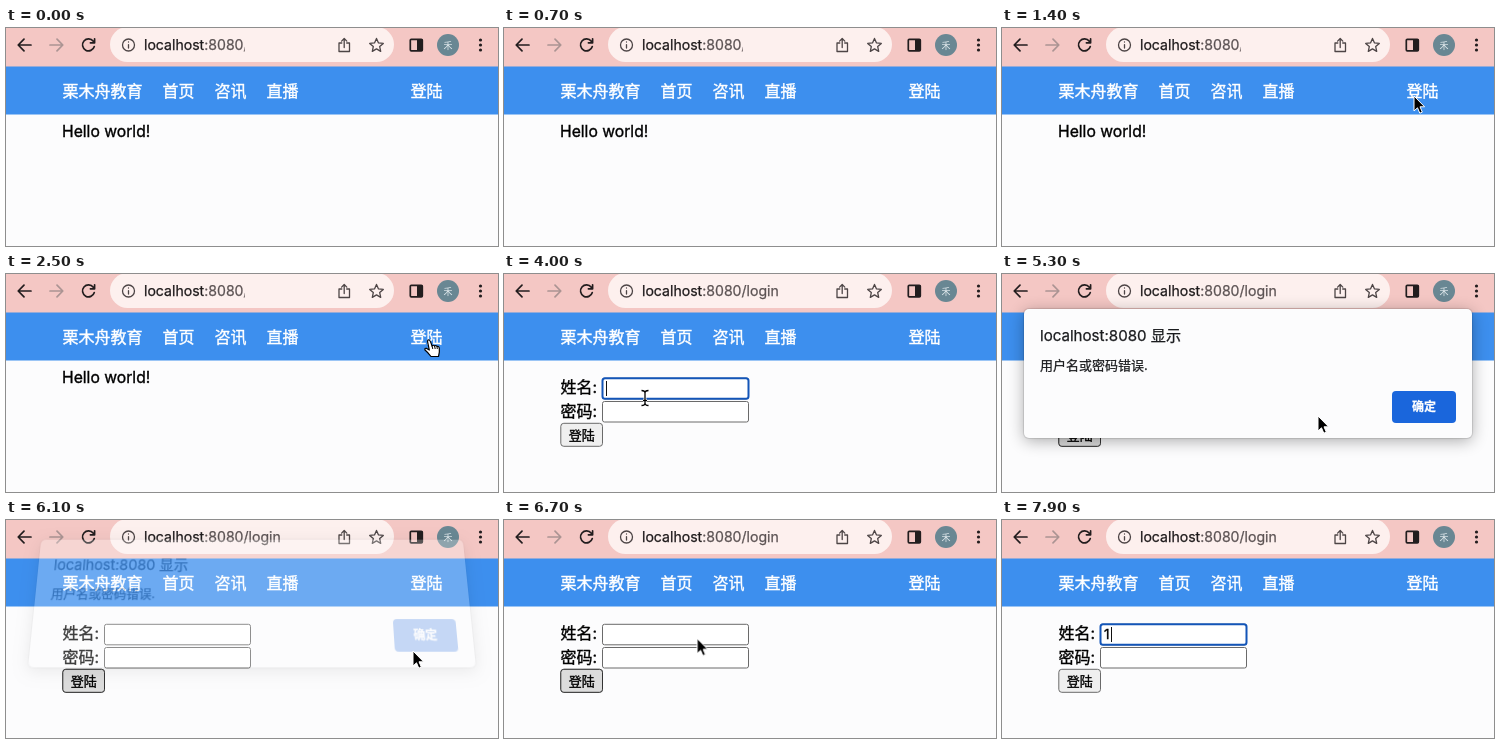
Write an HTML page that moves like this. It is 492 by 218 pixels and loops after 8 s.

```html
<!DOCTYPE html>
<html lang="zh-CN">
<head>
<meta charset="utf-8">
<title>Login demo</title>
<style>
html, body { margin: 0; width: 100%; height: 100%; overflow: hidden; background: #fcfcfd; }
body { position: relative; font-family: Inter, "Noto Sans CJK SC", "Noto Sans CJK", sans-serif; }
svg { position: absolute; left: 0; top: 0; display: block; }
text { white-space: pre; }
.line { fill: none; stroke: #221d1e; stroke-width: 1.7; stroke-linecap: round; stroke-linejoin: round; }
.nav { font-size: 16px; fill: #fff; stroke: #fff; stroke-width: .4; }
.ink { fill: #000; stroke: #000; stroke-width: .35; }
.body { font-size: 16px; }
.field { fill: #fff; stroke: #6a6a6a; }

/* every timeline lasts 8 s, 1% = 80 ms */
.home, .login, .focus, .caret1, .caret2, .typed, .pressed, .arrow, .hand, .beam {
  animation: 8s step-end infinite;
}
.home { animation-name: home; }
.login { animation-name: login; }
.focus { animation-name: focus; }
.caret1 { animation-name: caret1; }
.caret2 { animation-name: caret2; }
.typed { animation-name: typed; }
.pressed { animation-name: pressed; }
.arrow { animation-name: arrow; }
.hand { animation-name: hand; }
.beam { animation-name: beam; }
.pointer { animation: move 8s ease-in-out infinite; }

@keyframes home { 0% { opacity: 1 } 36.25%, 100% { opacity: 0 } }
@keyframes login { 0% { opacity: 0 } 36.25%, 100% { opacity: 1 } }
@keyframes focus { 0%, 58.75% { opacity: 0 } 47.5%, 87.5%, 100% { opacity: 1 } }
@keyframes caret1 { 0%, 53.75%, 93.75%, 100% { opacity: 0 } 47.5%, 87.5% { opacity: 1 } }
@keyframes caret2 { 0% { opacity: 0 } 95%, 100% { opacity: 1 } }
@keyframes typed { 0% { opacity: 0 } 95%, 100% { opacity: 1 } }
@keyframes pressed { 0%, 87.5%, 100% { opacity: 0 } 58.75% { opacity: 1 } }
@keyframes arrow { 0%, 18.75%, 45%, 86.25%, 100% { opacity: 0 } 9%, 37.5%, 52.5% { opacity: 1 } }
@keyframes hand { 0%, 37.5%, 100% { opacity: 0 } 18.75% { opacity: 1 } }
@keyframes beam { 0%, 52.5%, 95%, 100% { opacity: 0 } 45%, 86.25% { opacity: 1 } }
@keyframes move {
  0%, 9% { transform: translate(494px, 152px) }
  12.5% { transform: translate(462px, 138px) }
  17.5% { transform: translate(412px, 68px) }
  21.25%, 36.25% { transform: translate(423px, 66px) }
  47.5%, 51.25% { transform: translate(141px, 124px) }
  56.25%, 60.6% { transform: translate(82px, 160px) }
  65.6%, 67.5% { transform: translate(316px, 142px) }
  72.5%, 77.5% { transform: translate(407px, 131px) }
  86.25%, 100% { transform: translate(150px, 116px) }
}

.alert {
  position: absolute; left: 22px; top: 35px; width: 448px; height: 129px;
  border-radius: 5px; background: #fcfcfd; color: #1b1c1f;
  box-shadow: 0 0 1px 1px rgba(0,0,0,.12), 0 3px 16px rgba(0,0,0,.32);
  transform-origin: 50% 100%;
  animation: alert 8s linear infinite;
}
.alert * { position: absolute; white-space: nowrap; -webkit-text-stroke: .25px; }
.alert h1 { margin: 0; left: 16px; top: 17px; font-size: 15.1px; line-height: 20px; font-weight: 400; }
.alert p { margin: 0; left: 16px; top: 47px; font-size: 13px; line-height: 18px; }
.alert b {
  left: 368px; top: 81.5px; width: 64px; height: 32px; border-radius: 4px;
  background: #1a66dc; color: #fff; font-size: 12px; line-height: 32px; text-align: center;
}
@keyframes alert {
  0%, 61.2% { opacity: 0; transform: translateY(-22px) perspective(400px) rotateX(13deg) scaleY(1.07) }
  63.1%, 74.4% { opacity: 1; transform: translateY(0) perspective(400px) rotateX(0deg) scaleY(1) }
  76.25% { opacity: .25; transform: translateY(-16.5px) perspective(400px) rotateX(10.4deg) scaleY(1.07) }
  77.3%, 100% { opacity: 0; transform: translateY(-22px) perspective(400px) rotateX(13deg) scaleY(1.07) }
}
</style>
</head>
<body>
<svg width="492" height="218" viewBox="0 0 492 218">
  <!-- toolbar -->
  <rect width="492" height="39" fill="#f4c7c4"/>
  <rect x="104" y="-1" width="284" height="35" rx="17.5" fill="#fdf0ee"/>
  <g class="line">
    <path d="M25 17H12.5M18 11.2L12.2 17L18 22.8"/>
    <path d="M44 17H56.5M51 11.2L56.8 17L51 22.8" stroke="#ab9493"/>
    <path d="M87.3 13.2A6 6 0 1 0 88.3 18.5M88.6 10.8V14.8H84.4"/>
    <g stroke-width="1.3" stroke="#4d4546">
      <circle cx="122.5" cy="17" r="6"/>
      <path d="M122.5 16.6V20M122.5 14V14.1"/>
      <path d="M335.8 15H333V23.5H343.5V15H340.7M338.2 19.5V10.8M335.6 13.1L338.2 10.5L340.8 13.1"/>
      <path d="M370.5 10.4L372.5 14.9L377.3 15.4L373.7 18.6L374.7 23.4L370.5 20.9L366.3 23.4L367.3 18.6L363.7 15.4L368.5 14.9Z"/>
    </g>
    <rect x="404.3" y="11.3" width="12" height="11.5" rx="1"/>
  </g>
  <path d="M411 11H416.5V23H411Z" fill="#221d1e"/>
  <circle cx="442" cy="17" r="11" fill="#698793"/>
  <text x="442" y="20.5" font-size="9" fill="#e4ecef" text-anchor="middle">禾</text>
  <g fill="#221d1e">
    <circle cx="474.5" cy="12" r="1.6"/><circle cx="474.5" cy="17" r="1.6"/><circle cx="474.5" cy="22" r="1.6"/>
  </g>
  <g font-size="14.1" stroke-width=".25">
    <text x="138" y="22" fill="#1f1b1c" stroke="#1f1b1c">localhost<tspan fill="#5c5354" stroke="#5c5354">:8080<tspan class="path">/login</tspan></tspan></text>
  </g>
  <rect class="home" x="238.8" y="8" width="40" height="20" fill="#fdf0ee"/>

  <!-- site header -->
  <rect y="38.5" width="492" height="48" fill="#3d8fee"/>
  <g class="nav">
    <text x="56.5" y="68.7">栗木舟教育</text>
    <text x="156.5" y="68.7">首页</text>
    <text x="208.5" y="68.7">咨讯</text>
    <text x="260.5" y="68.7">直播</text>
    <text x="404.5" y="68.7">登陆</text>
  </g>

  <text class="home ink" x="56" y="109" font-size="15.7">Hello world!</text>

  <g class="login">
    <g class="body ink">
      <text x="56.5" y="119">姓名:</text>
      <text x="56.5" y="142.5">密码:</text>
    </g>
    <rect class="field" x="98.5" y="104.3" width="146" height="20.5" rx="2"/>
    <rect class="field" x="98.5" y="127.5" width="146" height="20.5" rx="2"/>
    <rect class="focus" x="98.5" y="104.3" width="146" height="20.5" rx="2.5" fill="#fff" stroke="#1355b8" stroke-width="2"/>
    <path class="caret1" d="M102.5 107V122" stroke="#111"/>
    <text class="typed ink" x="102" y="119" font-size="13.5">1</text>
    <path class="caret2" d="M109.5 107V122" stroke="#111"/>
    <rect x="56.8" y="149.3" width="41.7" height="23" rx="3" fill="#efefef" stroke="#6a6a6a"/>
    <rect class="pressed" x="56.8" y="149.3" width="41.7" height="23" rx="3" fill="#dcdcdc" stroke="#333"/>
    <text class="ink" x="64.7" y="165.5" font-size="13">登陆</text>
  </g>
</svg>

<div class="alert">
  <h1>localhost:8080 显示</h1>
  <p>用户名或密码错误.</p>
  <b>确定</b>
</div>

<svg width="492" height="218" viewBox="0 0 492 218">
  <g class="pointer">
    <path class="arrow" d="M0 0V15L3.5 11.8L5.8 17.2L8.3 16.1L6 10.8H10.6Z" fill="#000" stroke="#fff" stroke-linejoin="round"/>
    <path class="hand" d="M-1.5 1.3Q-1.3 -.6 .3 0Q1.3 .5 3 6Q4.5 4.5 5.6 6Q7 4.8 8 6.5Q10 5.8 10.3 8.5Q10.8 12 9.5 16.5H2Q-1 12.5 -4 10Q-4.5 7.8 -2.3 8.4L.3 10Z" fill="#fff" stroke="#000" stroke-width="1.2" stroke-linejoin="round"/>
    <path class="hand" d="M3 6L3.8 9M5.6 6L6.2 9M8 6.5L8.3 9" fill="none" stroke="#000"/>
    <g class="beam" fill="none">
      <path d="M-3.5 -7.5Q0 -7.5 0 -5Q0 -7.5 3.5 -7.5M0 -5V5M-3.5 7.5Q0 7.5 0 5Q0 7.5 3.5 7.5M-2 2.5H2" stroke="#fff" stroke-width="2.8"/>
      <path d="M-3.5 -7.5Q0 -7.5 0 -5Q0 -7.5 3.5 -7.5M0 -5V5M-3.5 7.5Q0 7.5 0 5Q0 7.5 3.5 7.5M-2 2.5H2" stroke="#000" stroke-width="1.3"/>
    </g>
  </g>
</svg>
</body>
</html>
```
